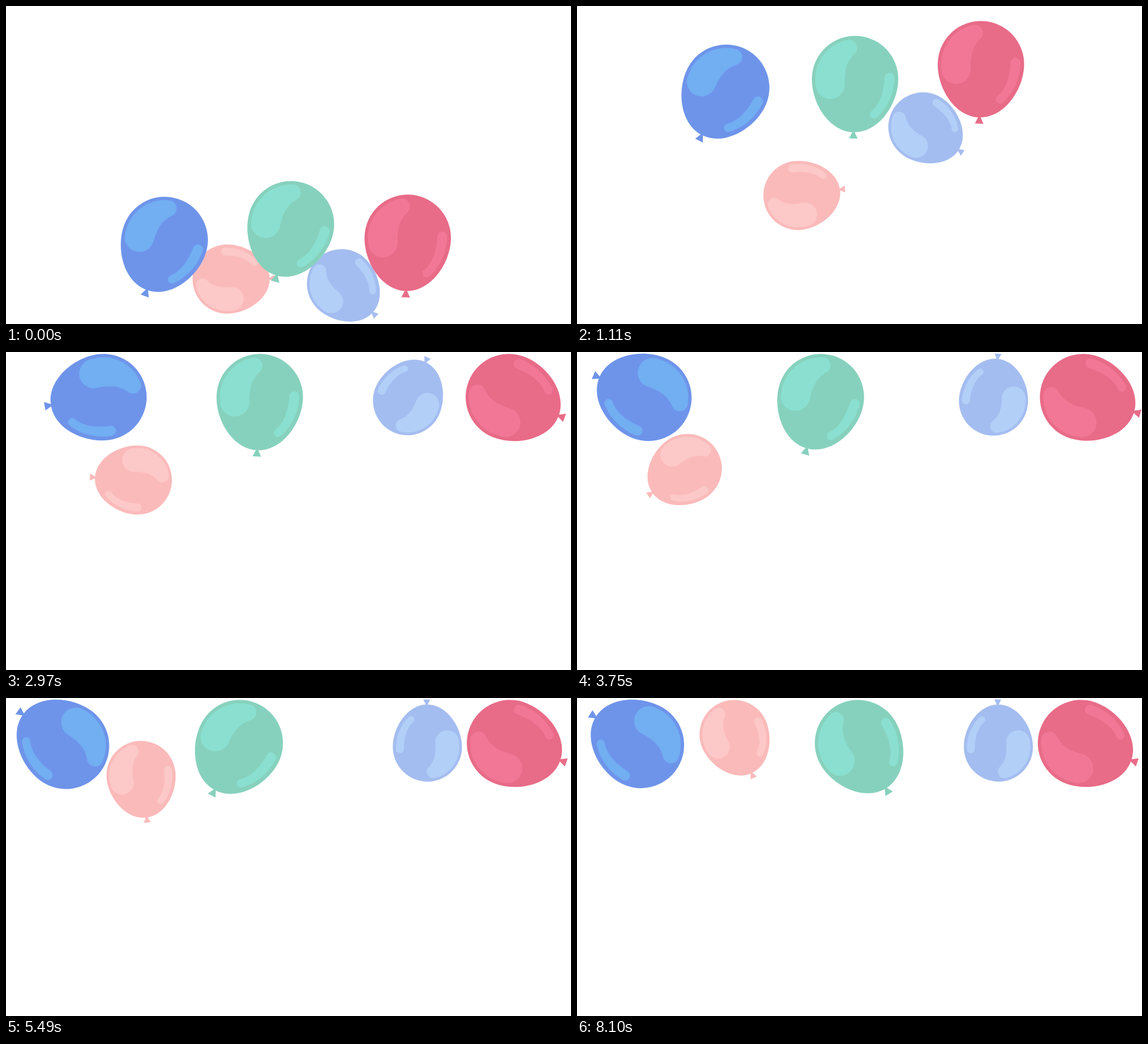
Recreate the animation shown at these times as an HTML page. Size 960 by 540 pixels, loop 8.16 s.

```html
<!DOCTYPE html>
<html lang="en">
<head>
<meta charset="utf-8">
<title>Balloons</title>
<style>
html, body { margin: 0; width: 100%; height: 100%; overflow: hidden; background: #fff; }
svg { display: block; width: 960px; height: 540px; }
</style>
</head>
<body>
<svg id="stage" viewBox="0 0 960 540"></svg>
<script>
const LOOP = 8160, END = 8100;
const LIFT = 2.3e-4, BOUNCE = 0.22, CEILING = 3.2, TOUCH = 137;
const RAD = Math.PI / 180;

const BODY = 'M-73.4 0A73.4 73.4 0 0 1 73.4 0C73.4 42 42 90.3 0 90.3S-73.4 42-73.4 0Z' +
  'M0 86L7.3 101H-7.3Z';
const SHINE = 'M-12.5-66.5A67.5 67.5 0 0 0-67 10A25 25 0 0 0-17 10C-19-16-14-32-1-44A14 14 0 0 0-12.5-66.5Z' +
  'M67-4C67 22 57 47 39 64A7 7 0 0 1 29 54C43 43 50 20 50-4A8.5 8.5 0 0 1 67-4Z';

const stage = document.getElementById('stage');
const balloons = [];

function add(tag, attrs, parent) {
  const el = document.createElementNS('http://www.w3.org/2000/svg', tag);
  for (const name in attrs) el.setAttribute(name, attrs[name]);
  return parent.appendChild(el);
}

// hops: [time, y, upward speed] at each launch or knock.
// path: [time, x, angle]; without an angle the balloon rolls on radius `roll`.
function balloon(color, shine, b) {
  b.path.forEach((k, i) => {
    const last = b.path[i - 1];
    k[2] ??= last[2] - (k[1] - last[1]) / b.roll / RAD;
  });
  b.g = add('g', {}, stage);
  add('path', { d: BODY, fill: color }, b.g);
  add('path', { d: SHINE, fill: shine }, b.g);
  balloons.push(b);
  return b;
}

const pink = balloon('#fbbaba', '#fcc8c8', {
  scale: 0.8,
  hops: [[0, 463.7, 0], [1600, 169, -0.193], [5985, 121, 0.062]],
  path: [[0, 375.7, -90.6], [1600, 375, -100], [1920, 300.7, -17.6], [2970, 223.3, 93.5],
    [4275, 177, 20], [4710, 184.5, 0.2], [5130, 215, -4], [6360, 252.7, -15.8], [7680, 266.9, -24.3]]
});

const blue = balloon('#6e94ea', '#71aef2', {
  scale: 1, roll: 81,
  hops: [[0, 397.4, 0.105]],
  path: [[0, 269.6, 19.6], [1110, 253.5, 27.2], [1920, 224.6, 39.4],
    [2970, 165.6], [4710, 88.8], [5985, 108.6]]
});

balloon('#a4bdf0', '#b2cff8', {
  scale: 0.8, roll: 75.5,
  hops: [[0, 471.7, 0.112], [1115, 203, -0.018], [1700, 174, -0.04]],
  path: [[0, 570, -46.9], [1110, 587.7, -57], [1920, 569.2, -69.4], [2970, 682.2], [4400, 716]]
});

balloon('#86d1bd', '#8adfd0', {
  scale: 1, roll: 77,
  hops: [[0, 370.8, 0.0943]],
  path: [[0, 484.2, 15.6], [1110, 472.5, 1.7], [1920, 446.5, -8.5],
    [2970, 431.2], [5100, 392.5], [6360, 422.3], [8600, 483]]
});

balloon('#e86b88', '#f27797', {
  scale: 1, roll: 73.4,
  hops: [[0, 394, 0.304]],
  path: [[0, 682.6, 2], [1135, 686.5, 1.7], [1920, 788.4, -18],
    [2970, 854.4], [3450, 860.5], [4710, 856.4]]
});

function slope(keys, i, c) {
  const a = keys[i], b = keys[i + 1];
  return a && b ? (b[c] - a[c]) / (b[0] - a[0]) : 0;
}

// Harmonic mean of the neighbouring slopes keeps the curve free of overshoot.
function tangent(keys, i, c) {
  const a = slope(keys, i - 1, c), b = slope(keys, i, c);
  return a * b > 0 ? 2 * a * b / (a + b) : 0;
}

function along(keys, t, c) {
  const next = keys.findIndex(k => k[0] > t);
  if (next < 0) return keys[keys.length - 1][c];
  const p = keys[next - 1], q = keys[next];
  const d = q[0] - p[0], u = (t - p[0]) / d, v = 1 - u;
  const m = tangent(keys, next - 1, c) * d, n = tangent(keys, next, c) * d;
  return p[c] + (q[c] - p[c]) * u * u * (3 - 2 * u) + u * v * (m * v - n * u);
}

// Height of the centre when a balloon turned by `angle` touches the ceiling.
function roofFor(angle, scale) {
  const c = Math.max(0, -Math.cos(angle * RAD)), s = Math.sqrt(1 - c * c);
  return CEILING + scale * Math.max(73.4 + 22 * c ** 3, 100 * c + 7 * s * c);
}

// Accelerated rise, one bounce, then rest against the ceiling.
function rise(hops, t, roof) {
  const [start, y0, v] = hops.findLast(h => h[0] <= t);
  const s = t - start, y = y0 - v * s - LIFT / 2 * s * s;
  if (y > roof) return y;
  const hit = Math.sqrt(v * v + 2 * LIFT * (y0 - roof));
  const after = s - (hit - v) / LIFT;
  return Math.max(roof, roof + BOUNCE * hit * after - LIFT / 2 * after * after);
}

function pose(b, t) {
  const x = along(b.path, t, 1), angle = along(b.path, t, 2);
  let y = rise(b.hops, t, roofFor(angle, b.scale));
  if (b === pink && t > b.hops[1][0]) {
    // Held down by the blue balloon until it slips past its side.
    const [bx, by] = pose(blue, t), gap = TOUCH ** 2 - (x - bx) ** 2;
    if (gap > 0) y = Math.max(y, by + Math.sqrt(gap));
  }
  return [x, y, angle];
}

function draw() {
  const t = Math.min(performance.now() % LOOP, END);
  for (const b of balloons) {
    const [x, y, angle] = pose(b, t);
    b.g.setAttribute('transform', `translate(${x} ${y}) rotate(${angle}) scale(${b.scale})`);
  }
  requestAnimationFrame(draw);
}
draw();
</script>
</body>
</html>
```
